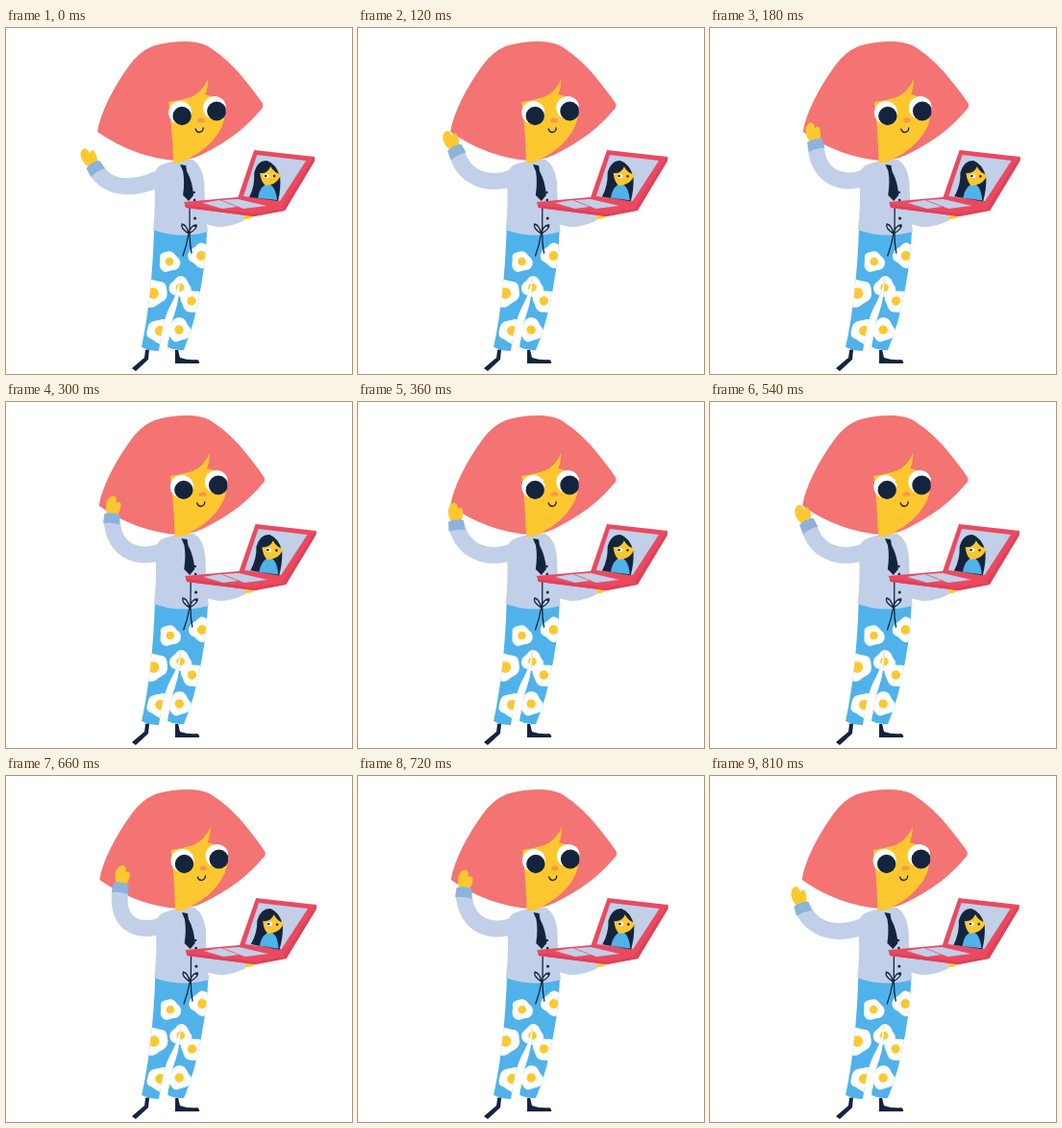
An HTML page for the animation above (0.84 s loop, 360 by 360 pixels).

```html
<!DOCTYPE html>
<html lang="en">
<head>
<meta charset="utf-8">
<title>Video call wave</title>
<style>
  html, body { margin: 0; width: 100%; height: 100%; overflow: hidden; background: #fff; }
  svg { display: block; width: 100vw; height: 100vh; }
  .hair { fill: #f47373; }
  .skin { fill: #fdc82f; }
  .shirt { fill: #c1cfe8; }
  .navy { fill: #14243d; }
  .cuff { fill: #8db2dc; }
  .blue { fill: #50b2ea; }
  .red { fill: #ea4a60; }
  .edge { fill: #df4059; }
  .white { fill: #fff; }
  .line { fill: none; stroke: #14243d; stroke-width: 1.3; stroke-linecap: round; }
</style>
</head>
<body>
<svg viewBox="0 0 360 360">
  <defs>
    <path id="legs" d="M154 208Q180 217 209 211Q208 240 203 268Q197 306 185 335Q176 336 168 332Q170 312 176 295Q181 280 181 258Q179 274 172 287Q163 302 159 336Q149 336 141 332Q152 280 154 208Z"/>
    <clipPath id="legClip"><use href="#legs"/></clipPath>
    <clipPath id="faceClip"><path d="M160 50H228.500V145H160Z"/></clipPath>
    <path id="petals" class="white" d="M-4-10C4-13 5-7 9-4C14 1 10 9 4 9C-1 9-3 13-8 9C-12 4-9 0-10-4C-10-8-8-9-4-10Z"/>
  </defs>

  <g id="figure">
    <path class="navy" d="M145 335L149 334L148 345L135 357L131 354L144 343Z"/>
    <path class="navy" d="M176 335H179L181 343Q190 346 199 345Q202 347 201 349H176Z"/>
    <use href="#legs" class="blue"/>
    <g id="flowers" clip-path="url(#legClip)"></g>

    <path class="shirt" d="M203 180H247L248 200Q234 207 222 207Q210 206 203 201Z"/>
    <path class="skin" d="M247 193H260Q257 199 248 199Z"/>
    <path class="shirt" d="M160 143Q175 136 194 137Q204 143 206 160Q207 190 210 212Q180 220 153 210Q156 180 154 160Q153 148 160 143Z"/>

    <path class="navy" d="M181 142L187 143L188 149Q194 160 195 174L190 180L184 174Q186 160 184 149Z"/>
    <g class="navy">
      <circle cx="195.500" cy="171" r="1.300"/><circle cx="196" cy="179" r="1.300"/>
      <circle cx="196.500" cy="198" r="1.500"/><circle cx="197" cy="206" r="1.300"/>
    </g>
    <path class="line" d="M191 184V214Q191 225 193 234M190 214Q188 226 184 237M190 214Q181 208 183 204Q188 205 190 214Q192 205 198 205Q199 209 190 214"/>

    <path class="red" d="M185 181L241 176L290 187V190L258 196L187 187Z"/>
    <path class="edge" d="M186 184L258 193L289 188V190L258 196L187 187Z"/>
    <path class="red" d="M258 127L321 134V138L290 190L241 177Z"/>
    <path class="edge" d="M318 138L321 134V138L290 190L287 187Z"/>
    <path class="shirt" d="M261 132L312 138L285 180L247 175Z"/>
    <path class="shirt" d="M204 182L222 179L240 186L225 188ZM224 179L241 178L271 185L247 188Z"/>
    <g id="caller">
      <path class="navy" d="M253 176Q259 164 258 151Q261 138 271 138Q281 141 285 155Q286 167 283 180Z"/>
      <path class="blue" d="M262 177Q264 164 272 162Q280 163 282 179Z"/>
      <path class="skin" d="M264 151Q272 152 275 144Q279 151 286 152Q283 161 275 163L270 164Q265 160 264 151Z"/>
      <ellipse class="white" cx="271" cy="154" rx="3" ry="2"/><circle class="navy" cx="270" cy="154" r="1.300"/>
      <circle class="navy" cx="279" cy="154" r="1.300"/>
    </g>

    <path class="hair" d="M95 108C98 88 111 63 128 39Q138 25 152 19Q168 14 186 14Q200 14 210 19Q232 33 249 55Q262 71 267 79Q268 83 264 86C252 101 232 118 203 132Q190 138 176 138Q132 134 95 108Z"/>
    <path class="skin" d="M169 77Q182 75 192 72Q204 67 210 53Q210 62 207 69Q219 72 227 78Q230 96 221 109Q211 125 190 136Q184 141 174 140Q173 106 169 77Z"/>
    <g clip-path="url(#faceClip)">
      <circle cx="181" cy="88" r="12" class="white"/><circle class="navy" cx="183" cy="91.500" r="9.700"/>
      <circle cx="217" cy="83" r="12" class="white"/><circle class="navy" cx="219" cy="86.500" r="10"/>
    </g>
    <ellipse cx="203" cy="96" rx="4" ry="2.500" fill="#f99a4b"/>
    <path class="line" d="M197 105Q198 108.500 201 108.500Q205 108 205 104"/>
  </g>

  <path id="arm" fill="none" stroke="#c1cfe8" stroke-width="17"/>
  <g id="hand">
    <path class="skin" d="M-5-4Q-9-14-6-20Q-3-25 1-24Q4-22 3-17Q6-20 8-17Q9-11 5-4Z"/>
    <path class="cuff" d="M-8-5Q0-8 8-5L8.500 5Q0 3-8.500 5Z"/>
  </g>
</svg>
<script>
const LOOP = 840, SLOT = 30, DRAWING = 35, PER_WAVE = 12;
const el = id => document.getElementById(id);
const place = (id, transform) => el(id).setAttribute('transform', transform);

// x, y, size
const flowers = [
  [170, 243, 1], [203, 237, 1.15], [153, 276, 1.35], [181, 270, 1],
  [193, 284, 1.1], [180, 314, 1.1], [160, 315, 1.2]
];
el('flowers').innerHTML = flowers.map(([x, y, size], i) =>
  `<g transform="translate(${x} ${y}) rotate(${i * 50}) scale(${size})">
    <use href="#petals"/><circle class="skin" r="4.300"/></g>`).join('');

// Cosine of the wave cycle, 1 at drawing number `peak`
const cycle = (drawing, peak) => Math.cos((drawing - peak) / PER_WAVE * 2 * Math.PI);

function draw() {
  // 24 drawings per loop, shown on a 30 ms clock
  const slotTime = Math.floor(performance.now() % LOOP / SLOT) * SLOT;
  const drawing = Math.floor((slotTime + 21) / DRAWING);
  const swing = (1 - cycle(drawing, 1)) / 2;

  const lean = swing * 2.6 / 270;
  place('figure', `matrix(1 0 ${-lean} 1 ${lean * 350} 0)`);
  place('caller', `rotate(${swing * 3} 270 178)`);

  const x = 92 + 15 * swing + 12 * swing ** 2;
  const y = 149.5 - 50 * swing + 17.5 * swing ** 2;
  const tilt = -16 - 26 * cycle(drawing, 1.8); // the hand trails the arm
  const elbowX = 108 + 5 * swing, elbowY = 156 + 20 * (1 - swing) ** 3;
  el('arm').setAttribute('d', `M${170 + swing * 2} 151C140 168 ${elbowX} ${elbowY} ${x} ${y}`);
  place('hand', `translate(${x} ${y}) rotate(${tilt})`);
  requestAnimationFrame(draw);
}
draw();
</script>
</body>
</html>
```
